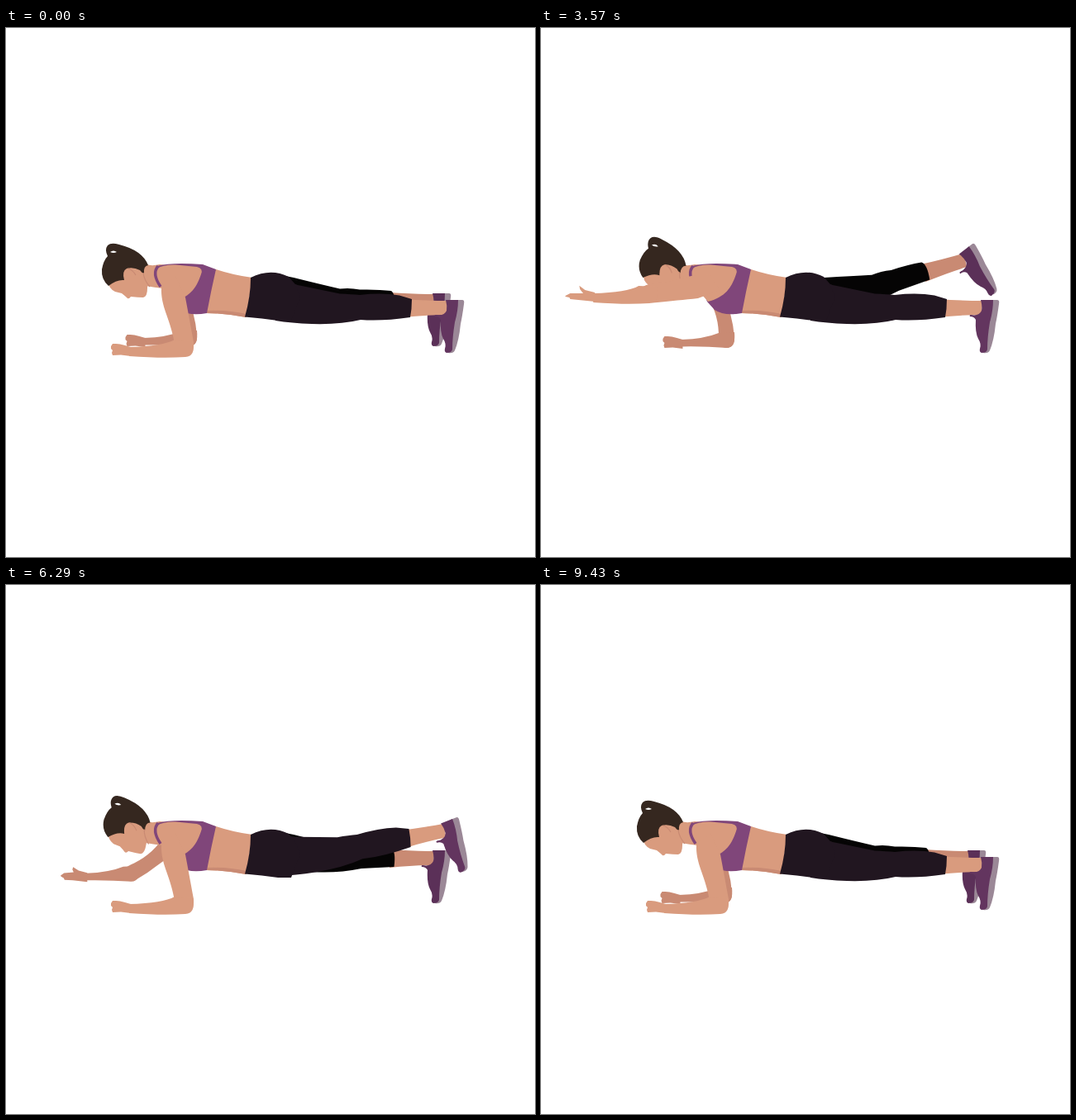
An HTML page without scripts for the animation above (9.57 s loop, 640 by 640 pixels).

```html
<!DOCTYPE html>
<html lang="en">
<head>
<meta charset="utf-8">
<title>Plank reach</title>
<style>
  @property --near { syntax: "<number>"; inherits: true; initial-value: 0; }
  @property --far { syntax: "<number>"; inherits: true; initial-value: 0; }

  html, body { margin: 0; width: 100%; height: 100%; overflow: hidden; background: #fff; }

  svg {
    display: block; width: 100%; height: 100%;
    --skin: #d99b7e; --shade: #c98a73; --hair: #35271f;
    --pants: #211620; --bra: #80467a;
    --out: cubic-bezier(.65, 0, .15, 1);
    --back: cubic-bezier(.85, 0, .35, 1);
    animation: near 9570ms infinite, far 9570ms infinite;
  }

  /* --near: near arm with far leg; --far: far arm with near leg */
  @keyframes near {
    0%, 55.28%, 100% { --near: 0; d: var(--fist); }
    4.49% { --near: 0; d: var(--fist); animation-timing-function: cubic-bezier(.65, 0, .15, 1); }
    26.86% { --near: 1; d: var(--open); }
    32.81% { --near: 1; d: var(--open); animation-timing-function: cubic-bezier(.85, 0, .35, 1); }
  }
  @keyframes far {
    0%, 98.54%, 100% { --far: 0; d: var(--fist); }
    55.28% { --far: 0; d: var(--fist); animation-timing-function: cubic-bezier(.65, 0, .15, 1); }
    76.91% { --far: 1; d: var(--open); }
    82.13% { --far: 1; d: var(--open); animation-timing-function: cubic-bezier(.85, 0, .35, 1); }
  }

  .hand {
    --fist: path("M151 386 L144 384 L138 382.5 L133 382 L129 382 L127 385 L127 388 L129 390 L128 393 L129 396 L139 395.5 L151 397 Z");
    --open: path("M151 385 L139 382 L132 376.5 L133 381 L137 386 L121 386 L115 389 L115 390 L120 391 L121 393 L131 394 L151 396 Z");
    d: var(--fist);
  }
  .near-hand { animation: near 9570ms infinite; }
  .far-hand { animation: far 9570ms infinite; }

  .head { transform-origin: 170px 304px; transform: rotate(calc((var(--near) + var(--far)) * 12.5deg)); }

  .near-arm { transform-origin: 203px 314px; transform: rotate(calc(var(--near) * 97deg)); }
  .near-forearm { transform-origin: 216px 386px; transform: rotate(calc(var(--near) * -97deg)); }
  .far-shift { transform: translate(calc(var(--near) * 3px), calc(var(--near) * 2px)); }
  .far-arm { transform-origin: 207px 308px; transform: rotate(calc(var(--far) * 96deg)); }
  .far-forearm { transform-origin: 222px 375px; transform: rotate(calc(var(--far) * -96deg)); }

  .near-leg { transform-origin: 318px 330px; transform: rotate(calc(var(--far) * -16deg)); }
  .near-foot { transform-origin: 531px 339px; transform: rotate(calc(var(--far) * -15deg)); }
  .far-leg { transform-origin: 345px 320px; transform: rotate(calc(var(--near) * -17deg)); }
  .far-foot { transform-origin: 515px 331px; transform: rotate(calc(var(--near) * -21deg)); }

  .skin { fill: var(--skin); }
  .shade { fill: var(--shade); }
  .pants { fill: var(--pants); }
  .line { fill: none; stroke: var(--shade); stroke-width: 1.2; }
</style>
</head>
<body>
<svg viewBox="0 0 640 640">
  <defs>
    <path id="calf" d="M480 328 Q510 330 534 330 L533 347 Q510 347 480 350 Z"/>
    <g id="shoe">
      <path fill="#9b8897" d="M545 329 L552 329 Q555 329 554 334 Q552 349 550 358 Q548 378 543 390 Q541 394 535 393 Z"/>
      <path d="M532 329 L547 329 Q547 342 543 356 Q540 374 540 389 Q539 393 533 393 Q530 392 531 388 Q533 382 529 376 Q525 368 526 353 Q524 349 519 349 Q518 347 520 347 Q530 349 533 342 Q534 336 532 329 Z"/>
    </g>
  </defs>

  <g class="far-leg">
    <use href="#calf" x="-16" y="-8" class="shade"/>
    <g class="far-foot"><use href="#shoe" x="-16" y="-8" fill="#5b3058"/></g>
    <path fill="#050404" d="M338 300 L348 302 Q380 310 404 315.500 Q416 314 428 316.500 Q450 316 466 318 Q472 322 469.500 341 L430 343 Q400 349 370 347 L330 340 Z"/>
  </g>

  <g class="far-shift shade">
    <g class="far-arm">
      <path d="M195 318 Q211 340 212 367 Q211 385 222 385 Q232 384 231 372 Q230 358 226 343 L217 300 Z"/>
      <g class="far-forearm">
        <path d="M167 375 Q195 374 212 367 L231 366 Q233 385 222 385 Q195 383 167 383.500 Z"/>
        <path class="hand far-hand" transform="translate(17.500 -11)"/>
      </g>
    </g>
  </g>

  <path class="skin" d="M162 284 Q174 289 186 286 L254 292 Q275 299 298 302 L291 350 Q265 345 241 345 L225 340 L190 315 Q180 314 169 312 Z"/>
  <path class="shade" d="M243 342 Q268 341 291 346 L290 350 Q265 345 243 345 Z"/>

  <g class="head">
    <path class="skin" d="M124 307 Q124 315 132 319 L140 321 Q144 324 147 327 Q149 328 151 325 Q160 326 166 326 Q171 325 171 315 L172 292 L150 286 Z"/>
    <path fill="var(--hair)" d="M123 276 Q119 268 123 263 Q127 259 137 262 Q165 269 172 287 Q166 288 167 297 Q164 296 162 293 Q154 289 146 291 Q140 294 143 305 Q134 304 124 312 Q115 304 116 292 Q118 281 123 276 Z"/>
    <path fill="#fff" d="M126 271 Q130 268 134 271 Q130 273 126 271 Z"/>
    <path class="line" d="M147 291 Q153 292 157 299 M166 296 Q167 305 174 313"/>
  </g>

  <g class="near-leg">
    <use href="#calf" class="skin"/>
    <g class="near-foot"><use href="#shoe" fill="#63355f"/></g>
    <path class="pants" d="M332 303 L342 303 Q347 311 358 312 L404 321.500 Q418 322 428 323 Q455 320 476 323.500 L491 328 Q491 340 489 350 Q455 355 429 353 Q405 359 370 358 Q345 357 326 354 L318 330 Z"/>
  </g>
  <path class="pants" d="M296 302 Q320 290 342 301 L349 309 L356 325 L345 354 L329 354 Q310 351 289 349.500 Q296 325 296 302 Z"/>

  <path fill="var(--bra)" d="M183 288 Q200 283 238 286 L254 292 Q248 318 243 345 Q222 349 210 341 L201 331 Z"/>
  <path class="skin" d="M183 291 Q190 286 205 286.500 L231 289 Q239 291 236 298 C231 312 225 325 202 331 L188 315 Q181 302 183 291 Z"/>
  <path fill="none" stroke="var(--bra)" stroke-width="3.500" d="M184 288 Q176 297 187 313"/>

  <g class="near-arm skin">
    <path d="M188 314 C187 337 198 350 203 377 Q206 398 217 397 Q228 396 227 380 C223 358 220 342 217 326 L205 300 Z"/>
    <g class="near-forearm">
      <path d="M149 386 Q190 385 204 377 L226 378 Q230 397 217 398 Q190 400 149 397 Z"/>
      <path class="hand near-hand"/>
    </g>
  </g>
</svg>
</body>
</html>
```
